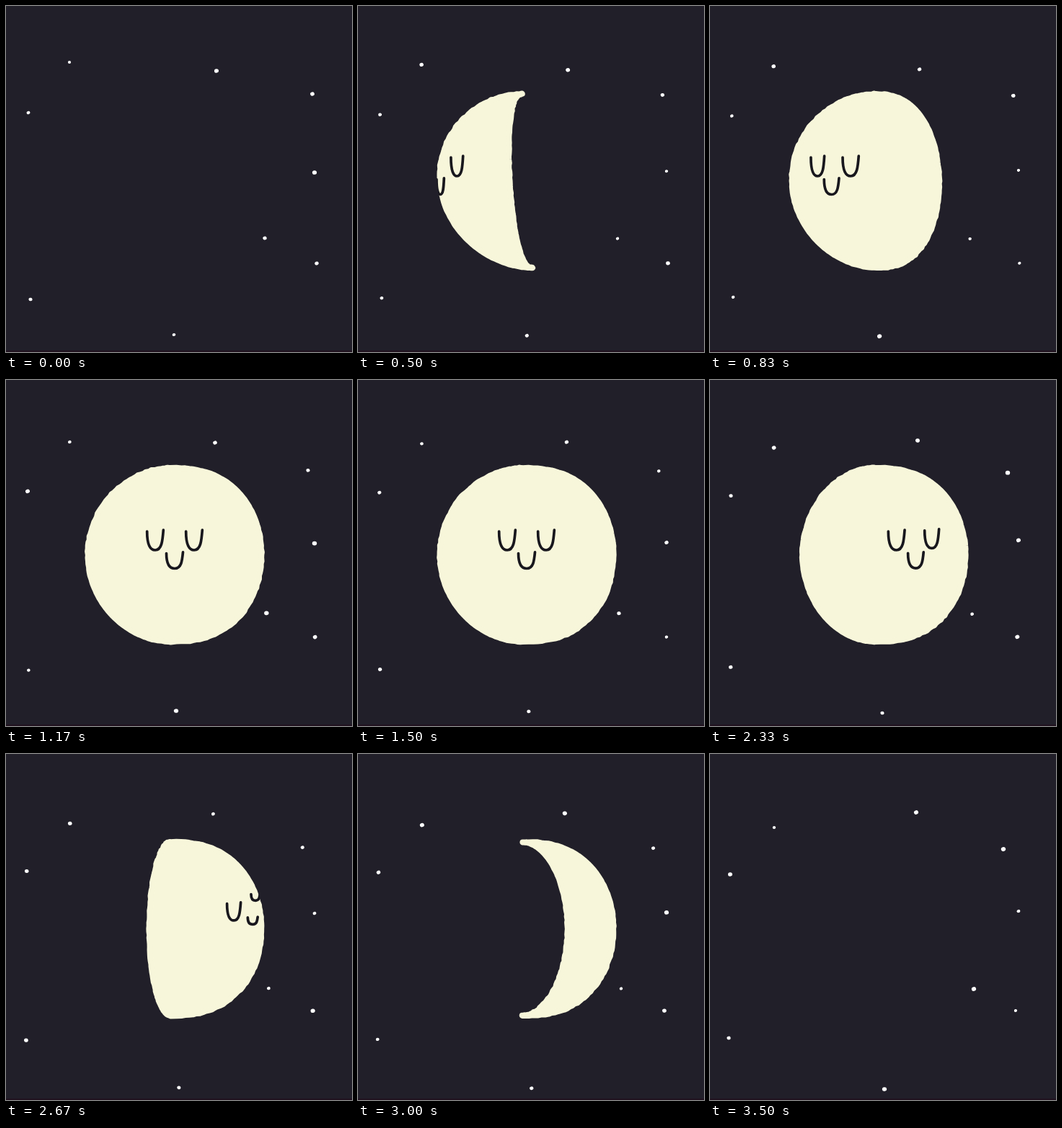
Animation of 480 by 480 pixels, one loop 3.67 s. Source, as an HTML page with a canvas:

```html
<!DOCTYPE html>
<html lang="en">
<head>
<meta charset="utf-8">
<title>Sleeping moon</title>
<style>
  html, body { margin: 0; height: 100%; overflow: hidden; background: #211f29; }
  canvas { display: block; width: 100vmin; height: 100vmin; }
</style>
</head>
<body>
<canvas id="stage" width="480" height="480"></canvas>
<script>
const ctx = document.getElementById('stage').getContext('2d');
const LOOP = 3670, STEPS = 22;
const CX = 234, CY = 242.5, RADIUS = 124.5, ROUNDING = 4;

// Where each star starts and ends its slow drift: x, y, x, y.
const STARS = [
  [88, 78, 89, 102], [31, 148, 28, 167], [292, 90, 286, 81],
  [425, 122, 407, 132], [428, 231, 428, 218], [359, 322, 366, 326],
  [431, 357, 424, 356], [34, 407, 26, 394], [233, 456, 242, 465]
];

const mix = (a, b, u) => a + (b - a) * u;
const clamp = (v, low, high) => Math.min(high, Math.max(low, v));
const sin = degrees => Math.sin(degrees * Math.PI / 180);
const cos = degrees => Math.cos(degrees * Math.PI / 180);

function noise(a, b) {
  const v = Math.sin(a * 127.1 + b * 311.7) * 43758.5453;
  return v - Math.floor(v);
}

// Both limbs run between the tips; inset so that the round outline stroke softens the tips.
function drawMoon(waxing, waning, step) {
  const leftEdge = CX - RADIUS * cos(waning) + ROUNDING;
  const rightEdge = CX - RADIUS * cos(waxing) - ROUNDING;
  const topTip = 228, bottomTip = 228 + 12 * (1 + cos(waxing));
  const limbPoint = (edge, fullness, angle) => {
    const y = -cos(angle);
    const x = mix(topTip, bottomTip, (y + 1) / 2)
      + (edge - (topTip + bottomTip) / 2) * Math.max(0, sin(angle)) ** fullness;
    const ragged = noise(angle + edge, step) - 0.5;
    ctx.lineTo(x + ragged, CY + y * (RADIUS - ROUNDING) + ragged);
  };
  ctx.beginPath();
  for (let angle = 0; angle <= 180; angle += 2) limbPoint(rightEdge, 0.8, angle);
  for (let angle = 180; angle >= 0; angle -= 2) limbPoint(leftEdge, 1.05, angle);
  ctx.closePath();
  ctx.fillStyle = ctx.strokeStyle = '#f7f6da';
  ctx.lineWidth = ROUNDING * 2;
  ctx.fill();
  ctx.stroke();
}

// A U-shaped stroke on the globe; it shrinks and rises as it nears the right limb.
function drawFeature(yaw, y, height) {
  const rise = Math.max(0, sin(yaw)) ** 6;
  const x = CX + 120 * sin(yaw);
  const w = 23 * Math.max(0.45, Math.max(0, cos(yaw)) ** 0.6) / 2;
  const h = height * (1 - rise) / 2;
  const middle = y - 36 * rise;
  ctx.beginPath();
  ctx.moveTo(x - w, middle - h);
  ctx.bezierCurveTo(x - w, middle + h * 0.4, x - w * 0.6, middle + h, x, middle + h);
  ctx.bezierCurveTo(x + w * 0.8, middle + h, x + w * 0.9, middle, x + w, middle - h * 1.15);
  ctx.stroke();
}

function drawFace(yaw) {
  if (Math.abs(yaw) > 90) return;
  ctx.globalCompositeOperation = 'source-atop';
  ctx.strokeStyle = '#18171d';
  ctx.lineWidth = 3.7;
  drawFeature(yaw, 251, 21);
  const eyesYaw = yaw * (1 - 0.25 * (yaw / 90) ** 2);
  for (const eyeYaw of [eyesYaw - 13, eyesYaw + 13]) {
    if (Math.abs(eyeYaw) < 75) drawFeature(eyeYaw, 223, 26);
  }
  ctx.globalCompositeOperation = 'source-over';
}

function drawStar([x0, y0, x1, y1], index, step) {
  const u = step / (STEPS - 1);
  const r = 1.9 + noise(index, step);
  ctx.beginPath();
  ctx.ellipse(mix(x0, x1, u), mix(y0, y1, u), r * 1.12, r, -noise(step, index) / 2, 0, Math.PI * 2);
  ctx.fill();
}

function draw(now) {
  // Six drawings a second.
  const step = Math.floor((now % LOOP) * 0.006 + 0.03) % STEPS;
  const waxing = clamp(step * 27, 0, 180);
  const waning = clamp((step - 12.7) * 21.7, 0, 180);

  ctx.clearRect(0, 0, 480, 480);
  ctx.lineCap = ctx.lineJoin = 'round';
  if (waxing > 0 && waning < 180) {
    drawMoon(waxing, waning, step);
    drawFace(Math.min(0, waxing - 168) + waning * 0.9);
  }
  ctx.fillStyle = '#fff';
  STARS.forEach((star, i) => drawStar(star, i, step));
  ctx.fillStyle = '#20121f';
  ctx.fillRect(0, 478, 480, 2);
}

const start = performance.now();
function tick() {
  draw(performance.now() - start);
  requestAnimationFrame(tick);
}
tick();
</script>
</body>
</html>
```
